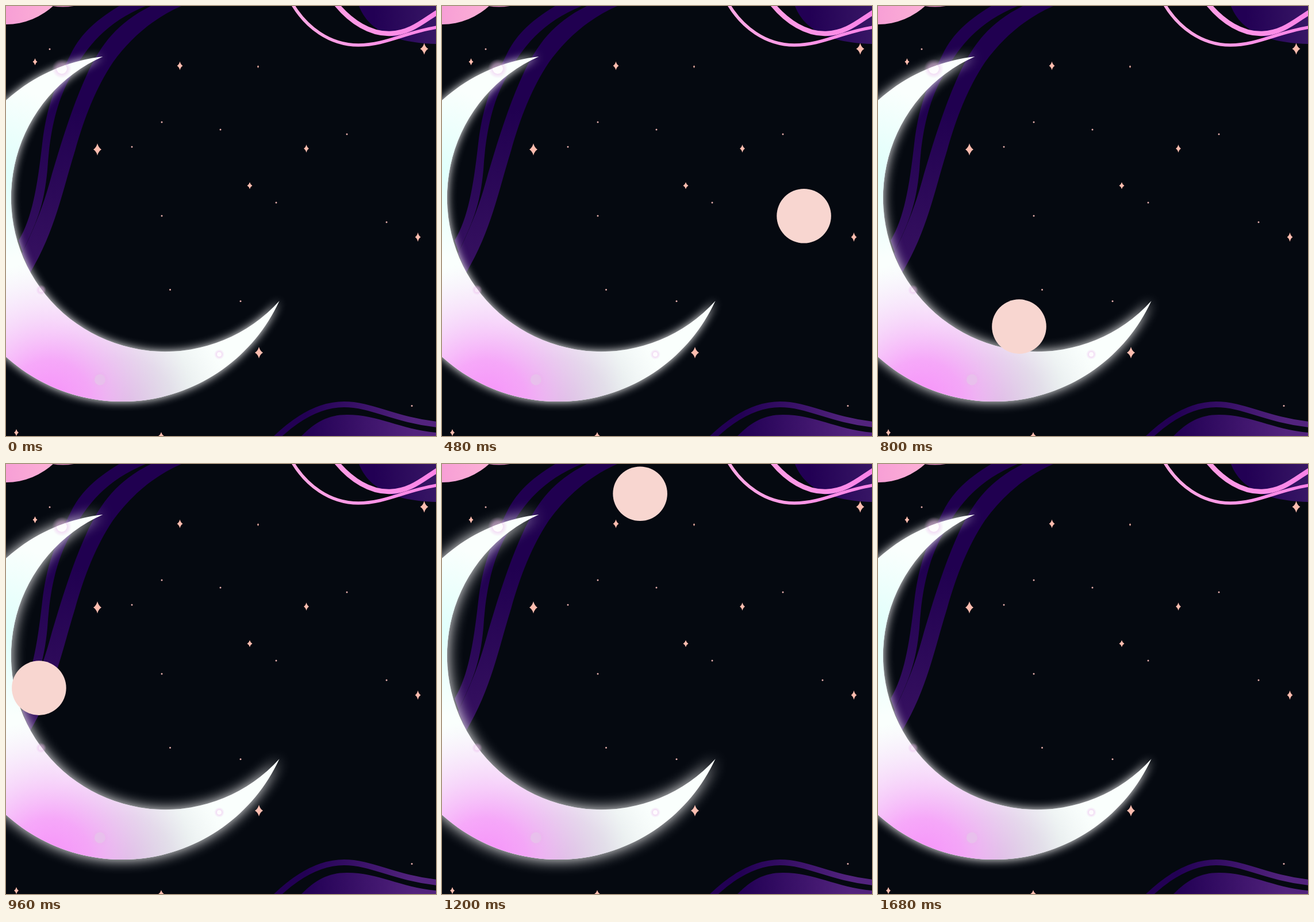
Recreate the animation shown at these times as an HTML page. Size 748 by 748 pixels, loop 1.76 s.

```html
<!DOCTYPE html>
<html lang="en">
<head>
<meta charset="utf-8">
<title>Moon slide</title>
<style>
  html, body { margin: 0; height: 100%; overflow: hidden; background: #050910; }
  svg { display: block; width: 100%; height: 100%; }
</style>
</head>
<body>
<svg viewBox="0 0 748 748">
  <defs>
    <linearGradient id="ribbon" gradientUnits="userSpaceOnUse" x1="0" y1="180" x2="0" y2="440">
      <stop stop-color="#200050"/><stop offset="1" stop-color="#35105f"/>
    </linearGradient>
    <linearGradient id="wave" gradientUnits="userSpaceOnUse" x1="520" y1="0" x2="710" y2="0">
      <stop stop-color="#220054"/><stop offset="1" stop-color="#52237d"/>
    </linearGradient>
    <linearGradient id="corner" gradientUnits="userSpaceOnUse" x1="640" y1="0" x2="748" y2="0">
      <stop stop-color="#220054"/><stop offset="1" stop-color="#371665"/>
    </linearGradient>
    <linearGradient id="pink" gradientUnits="userSpaceOnUse" x1="500" y1="0" x2="748" y2="0">
      <stop stop-color="#ffa9e4"/><stop offset="1" stop-color="#fb83e8"/>
    </linearGradient>
    <linearGradient id="cloud" gradientUnits="userSpaceOnUse" x1="0" y1="0" x2="80" y2="0">
      <stop stop-color="#f79fd6"/><stop offset="1" stop-color="#fcb0d6"/>
    </linearGradient>
    <radialGradient id="cyan" gradientUnits="userSpaceOnUse" cx="-10" cy="290" r="150">
      <stop stop-color="#dffffb"/><stop offset="1" stop-color="#dffffb" stop-opacity="0"/>
    </radialGradient>
    <radialGradient id="grey" gradientUnits="userSpaceOnUse" cx="210" cy="695" r="180">
      <stop stop-color="#c9cdd4"/><stop offset=".45" stop-color="#d6dbdf" stop-opacity=".75"/>
      <stop offset="1" stop-color="#e6ebed" stop-opacity="0"/>
    </radialGradient>
    <radialGradient id="rose" gradientUnits="userSpaceOnUse" cx="75" cy="690" r="245">
      <stop stop-color="#f78ffa"/><stop offset=".3" stop-color="#f69ff9" stop-opacity=".9"/>
      <stop offset=".6" stop-color="#f4b4f8" stop-opacity=".5"/>
      <stop offset="1" stop-color="#f4d0f8" stop-opacity="0"/>
    </radialGradient>
    <radialGradient id="halo">
      <stop offset=".5" stop-color="#e9b3ea" stop-opacity=".45"/>
      <stop offset="1" stop-color="#e9b3ea" stop-opacity="0"/>
    </radialGradient>
    <path id="crescent" d="M168.500 88A301 301 0 1 0 475.500 513A268 268 0 1 1 168.500 88Z"/>
    <clipPath id="inside"><use href="#crescent"/></clipPath>
  </defs>

  <rect width="748" height="748" fill="#050910"/>
  <g fill="url(#ribbon)">
    <path d="M197 0C150 28 126 55 112 85C84 140 70 180 63 240C56 300 48 365 22 408L29 428C52 378 66 350 72 285C76 220 88 165 113 122C140 70 175 28 243 0Z"/>
    <path d="M252 0C192 30 166 68 144 112C116 172 97 235 80 292C66 345 52 380 28 430L42 464C86 390 98 322 120 252C136 195 156 143 186 98C217 55 257 21 305 0Z"/>
  </g>
  <circle cy="-89" r="121" fill="url(#cloud)"/>
  <path d="M80 0H118Q99 3 80 0Z" fill="#e08bbd"/>
  <path d="M614 0C627 34 662 64 748 66V0Z" fill="url(#corner)"/>
  <g fill="none" stroke="url(#pink)">
    <path d="M499 -2C522 36 562 68 613 68C660 68 694 46 750 37" stroke-width="5.500"/>
    <path d="M574 -4C600 28 634 49 668 48C702 47 722 29 750 11" stroke-width="8.500"/>
  </g>
  <path d="M468 753C504 718 544 693 588 693C636 693 676 720 750 728" fill="none" stroke="url(#wave)" stroke-width="10"/>
  <path d="M514 748C538 724 560 711 593 711C648 711 685 736 748 742V748Z" fill="url(#wave)"/>
  <g id="stars" fill="#fdbcae"></g>

  <g id="moon">
    <use href="#crescent" fill="#fafffd"/>
    <use href="#crescent" fill="url(#cyan)"/>
    <use href="#crescent" fill="url(#grey)"/>
    <use href="#crescent" fill="url(#rose)"/>
  </g>
  <g fill="url(#halo)">
    <circle cx="97" cy="109" r="17"/><circle cx="163.500" cy="650" r="15"/>
    <circle cx="371" cy="606" r="9"/><circle cx="61" cy="494" r="9"/>
  </g>
  <g fill="#fff" clip-path="url(#inside)">
    <circle cx="97" cy="109" r="9" opacity=".95"/><circle cx="163.500" cy="650" r="9.500" fill="#e8c0ec"/>
    <circle cx="371" cy="606" r="4" opacity=".9"/><circle cx="61" cy="494" r="4" opacity=".5"/>
  </g>
  <circle id="ball" r="47.300" fill="#f8d6d0"/>
</svg>
<script>
const LOOP = 1760, STEP = 80;
const $ = id => document.getElementById(id);

// x, y, half width, half height
const sparkles = [
  [50.5, 97, 4, 6], [302.5, 104, 5, 7.5], [727.5, 74.5, 7, 10], [159, 249.5, 7, 10.5],
  [522.5, 248, 4.5, 7], [424, 312.5, 4.5, 6], [716.5, 402, 5, 8], [440, 603, 7, 10],
  [18, 742, 4, 6], [270, 748, 5, 7], [438.5, 105.5, 1.7, 2.7]
];
const dots = [
  [76, 75], [271, 202], [373, 215], [219, 245], [593, 223], [470, 342],
  [271, 365], [662, 376], [285.5, 493.5], [408, 513.5], [706, 695.5]
];
const sparkle = ([x, y, w, h]) => {
  const a = w * .28, b = h * .28;
  return `<path d="M${x} ${y - h}Q${x + a} ${y - b} ${x + w} ${y}Q${x + a} ${y + b} ${x} ${y + h}` +
    `Q${x - a} ${y + b} ${x - w} ${y}Q${x - a} ${y - b} ${x} ${y - h}"/>`;
};
$('stars').innerHTML = sparkles.map(sparkle).join('') +
  dots.map(([x, y]) => `<circle cx="${x}" cy="${y}" r="1.5" fill="#e5aeab"/>`).join('');

// Distance along the track, measured from the point where the arc begins
const times = [0, 480, 640, 800, 1040, 1200];
const stops = [-502, -196.5, 0, 246, 663, 1009];
const speed = t => 1.112 * (t / 480) ** .75;

function distance(t) {
  if (t >= 1200) return 1009 + (t - 1200) * 2.3;
  const i = times.findIndex(end => t < end) - 1;
  const span = times[i + 1] - times[i], u = (t - times[i]) / span, v = 1 - u;
  return stops[i] * v * v * (1 + 2 * u) + stops[i + 1] * u * u * (3 - 2 * u) +
    span * u * v * (speed(times[i]) * v - speed(times[i + 1]) * u);
}

// Straight approach, arc along the inside of the moon, tangent exit at the upper tip
const arc = { x: 278, y: 332, r: 228, from: .635, to: 4.288 };
function position(s) {
  const angle = Math.min(arc.from + Math.max(s, 0) / arc.r, arc.to);
  const over = Math.max(0, s - (arc.to - arc.from) * arc.r);
  const before = Math.min(s, 0);
  return [
    arc.x + arc.r * Math.cos(angle) - over * Math.sin(angle) - before * .855,
    arc.y + arc.r * Math.sin(angle) + over * Math.cos(angle) + before * .519
  ];
}

function draw(now) {
  const t = Math.floor(now % LOOP / STEP) * STEP;
  const [x, y] = position(distance(t));
  $('ball').setAttribute('transform', `translate(${x} ${y})`);
  const pulse = ((1 + Math.cos(2 * Math.PI * (t - 1150) / LOOP)) / 2) ** 2;
  $('moon').style.filter = `drop-shadow(0 0 ${8 + 5 * pulse}px #fff)`;
  requestAnimationFrame(draw);
}
draw(0);
</script>
</body>
</html>
```
